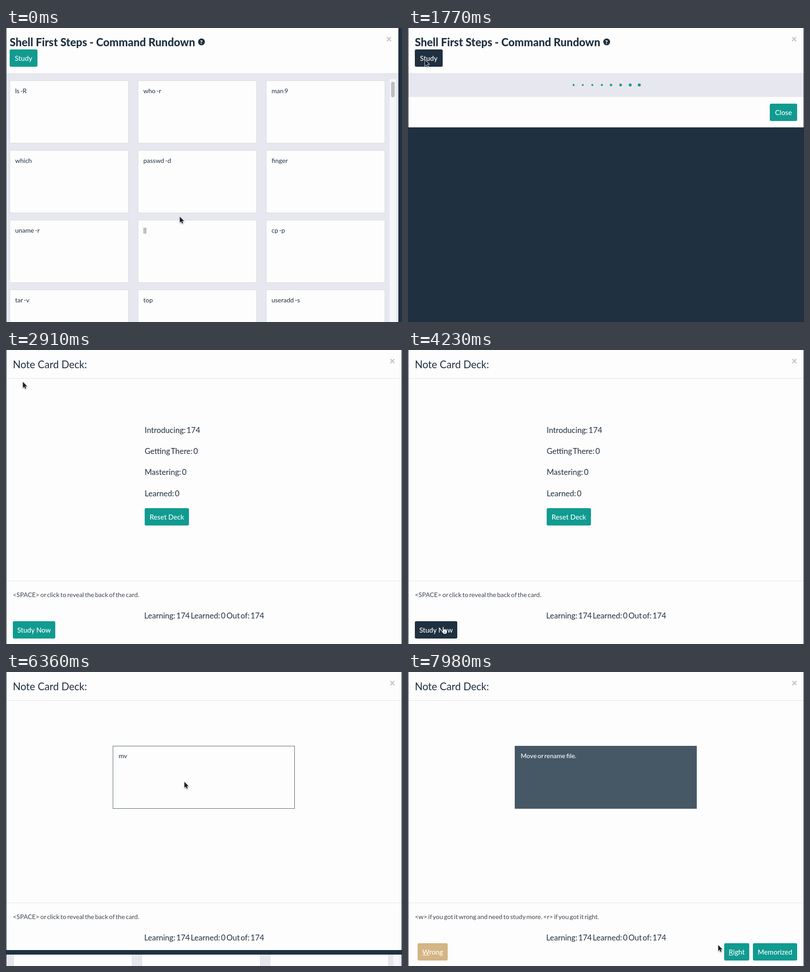
Recreate the animation shown at these times as an HTML page. Size 868 px wide and 645 px high, loop 8 s.

```html
<!DOCTYPE html>
<html lang="en">
<head>
<meta charset="utf-8">
<title>Note cards</title>
<style>
html, body { margin: 0; width: 100%; height: 100%; overflow: hidden; background: #1f3040; }
body { position: relative; font: 14px Lato, "Open Sans", sans-serif; color: #1f3040; }
div, span, svg { position: absolute; box-sizing: border-box; white-space: nowrap; }
.t { line-height: 30px; word-spacing: -.11em; }
.h1 { font-size: 23.9px; font-weight: 800; word-spacing: 0; }
.h2 { font-size: 22.3px; word-spacing: 0; }
.m { font-size: 17.1px; word-spacing: -.14em; }
.hint { color: #3d4650; }
.x { font-size: 22px; font-weight: 900; color: #c6c6c6; }
.btn { border-radius: 3px; background: #119b90; color: #fff; font-size: 15.2px; font-weight: 500; line-height: 38px; text-align: center; }
.btn.on { background: #1f3040; }
.tan { background: #d4b584; }
.white, .card { background: #fdfdfd; }
.card { border: 1px solid #d9d9dc; }
.body { background: #e7e7ef; }
.line { background: #e2e3e6; }
.thumb { background: #bfbfc1; border-radius: 4px; }
.track { background: #f6f6fa; }
.dot { background: #119b90; border-radius: 50%; }
.mark { background: #1f3040; color: #fff; border-radius: 50%; font: 900 12px/15px Lato, sans-serif; text-align: center; }
#list { overflow: hidden; }
#quiz { border-color: #52646c; }
#quiz.back { background: #465866; border-color: #465866; color: #fff; font-weight: 500; }
#deck { border-bottom: 0 solid #1f3040; }
</style>
</head>
<body>
<script>
const LOOP = 8000, LOAD = 1230, OPEN = 1779, STUDY = 4380, REVEAL = 6420, FLIP = 600;

const box = (x, y, w, h, cls = '', inner = '', id = '') =>
  `<div id="${id}" class="${cls}" style="left:${x}px;top:${y}px;width:${w}px;height:${h}px">${inner}</div>`;
const button = (x, y, w, label, id = '', cls = '') => box(x, y, w, 38, 'btn ' + cls, label, id);
const text = (x, y, s, cls = '') =>
  `<span class="t ${cls}" style="left:${x}px;top:${y - 15}px">${s}</span>`;
const group = (id, inner) => box(0, 0, 0, 0, '', inner, id);

const commands = ['ls -R', 'who -r', 'man 9', 'which', 'passwd -d', 'finger',
  'uname -r', '||', 'cp -p', 'tar -v', 'top', 'useradd -s'];
const columns = [8, 289, 570];
const cards = commands.map((c, i) =>
  box(columns[i % 3] - 1, 115 + 153 * Math.floor(i / 3), 261, 138, 'card', text(11, 22, c), 'card' + i)).join('');

const dots = Array.from({length: 8}, (_, i) => box(358.5 + i * 20.7, 122, 6, 6, 'dot')).join('');
const stats = ['Introducing: 174', 'Getting There: 0', 'Mastering: 0', 'Learned: 0']
  .map((s, i) => text(303, 175.5 + i * 46.4, s, 'm')).join('');

document.body.innerHTML =
  box(1, 0, 859, 645, 'white',
    group('grid', box(-8, 100, 875, 545, 'body') + cards +
      box(840, 112, 14, 533, 'track') + box(843, 118, 8, 34, 'thumb')) +
    group('loader', box(0, 100, 866, 50, 'body') + dots + box(0, 150, 866, 1, 'line') +
      button(792, 166, 60, 'Close')) +
    box(0, 99, 866, 1, 'line') +
    group('head', text(7, 31, 'Shell First Steps', 'h1') + text(182, 31, '- Command Rundown', 'h1') +
      box(419.5, 23, 15, 15, 'mark', '?') + text(832, 24, '×', 'x') +
      button(7, 47, 61, 'Study', 'study')), 'list') +
  box(1, 0, 866, 648, 'white',
    text(14, 32, 'Note Card Deck:', 'h2') + text(839.5, 24, '×', 'x') +
    box(0, 62, 866, 1, 'line') + box(0, 506, 866, 1, 'line') +
    text(302, 582.5, 'Learning: 174 Learned: 0 Out of: 174', 'm') +
    group('stats', stats + button(303, 347, 97, 'Reset Deck')) +
    group('start', button(14, 595, 93, 'Study Now', 'now')) +
    group('ask', text(14, 536.5, '&lt;SPACE&gt; or click to reveal the back of the card.', 'hint')) +
    group('grade', text(14, 536.5, '&lt;w&gt; if you got it wrong and need to study more. &lt;r&gt; if you got it right.', 'hint') +
      button(20, 595, 66, '<u>W</u>rong', '', 'tan') + button(692, 595, 55, '<u>R</u>ight') +
      button(755, 595, 97, 'Memorized')) +
    box(233, 162, 399, 138, 'card', '', 'quiz'), 'deck') +
  `<svg id="cursor" width="24" height="24" style="overflow:visible;filter:drop-shadow(0 1px 1px #0006)">
    <path id="arrow" d="M0 0V13L3 10.2L5 15L7.3 14L5.3 9.4H9.4Z" fill="#14202c" stroke="#fff" paint-order="stroke" stroke-width="1.6"/>
    <path id="hand" d="M-1 1.3a1.3 1.3 0 0 1 2.6 0V6l2-.4 1.6.8 1.5.1 1 1.2q1 .3 1 2.2v2.5L7.2 16H.8L-3 10.8q-1-2 .7-2L-1 10ZM2.5 10.5v3M4.5 10.5v3" fill="#fff" stroke="#14202c" stroke-width=".9"/>
  </svg>`;

const $ = id => document.getElementById(id);
const clamp = v => Math.max(0, Math.min(1, v));
const show = (id, on) => $(id).style.display = on ? '' : 'none';
const swing = p => 90 * (1 - Math.cos(Math.PI * p));
const tilt = (el, deg) => el.style.transform = deg ? `perspective(1300px) rotateX(${deg}deg)` : '';

// Vertical coordinate of the cubic-bezier(0, 0, .58, 1) curve
function easeOut(x) {
  let lo = 0, hi = 1, s;
  for (let i = 0; i < 20; i++) {
    s = (lo + hi) / 2;
    if (1.74 * (1 - s) * s * s + s ** 3 < x) lo = s; else hi = s;
  }
  return 3 * (1 - s) * s * s + s ** 3;
}

// time, x, y
const path = [[180, 381, 414], [960, 37, 70], [2910, 37, 70], [3700, 77, 607],
  [5250, 77, 607], [6030, 391, 241], [7500, 391, 241], [7980, 680, 599]];
function pointer(t) {
  let [, x, y] = path[0];
  for (let i = 1; i < path.length; i++) {
    const [a, x0, y0] = path[i - 1], [b, x1, y1] = path[i];
    if (t < a) break;
    const p = clamp((t - a) / (b - a)), e = p * p * (3 - 2 * p);
    x = x0 + (x1 - x0) * e;
    y = y0 + (y1 - y0) * e;
  }
  return [x, y];
}

// card index, pointer enters, pointer leaves
const hovers = [[4, 203, 390], [3, 437, 515], [0, 584, 860]];
const dotEls = [...document.querySelectorAll('.dot')];

function draw(t) {
  const loading = t >= LOAD && t < 2400, moved = t >= LOAD;
  const list = $('list').style;
  list.width = (moved ? 866 : 859) + 'px';
  list.height = (loading ? 218 : 645) + 'px';
  $('head').style.left = (moved ? 7 : 0) + 'px';
  $('grid').style.left = (moved ? 8 : 0) + 'px';
  show('grid', !loading);
  show('loader', loading);
  $('study').classList.toggle('on', t >= 930);
  for (const [i, enter, leave] of hovers) {
    const phase = clamp((Math.min(t, leave) - enter) / FLIP) - clamp((t - leave) / FLIP);
    tilt($('card' + i), swing(clamp(phase)));
  }
  dotEls.forEach((d, i) =>
    d.style.transform = `scale(${0.9 + 0.2 * Math.sin((t - 1890) / 120 - i * 0.5)})`);

  const deck = $('deck').style, asking = t >= STUDY && t < REVEAL;
  show('deck', t >= OPEN);
  deck.opacity = clamp((t - OPEN) / 150);
  deck.transform = `translateY(${-162 * (1 - easeOut(clamp((t - OPEN) / 300)))}px)`;
  deck.height = (asking ? 620 : 648) + 'px';
  deck.borderBottomWidth = (asking ? 10 : 0) + 'px';
  show('stats', t < STUDY);
  show('start', t < STUDY);
  show('quiz', t >= STUDY);
  show('ask', t < REVEAL);
  show('grade', t >= REVEAL);
  $('now').classList.toggle('on', t >= 3720);

  const deg = swing(clamp((t - REVEAL) / FLIP)), back = deg > 90, quiz = $('quiz');
  quiz.classList.toggle('back', back);
  quiz.innerHTML = text(12, 21, back ? 'Move or rename file.' : 'mv');
  tilt(quiz, back ? deg - 180 : deg);

  const [x, y] = pointer(t), hand = (t >= 930 && t < LOAD) || (t >= 3720 && t < STUDY);
  $('cursor').style.left = x + 'px';
  $('cursor').style.top = y + 'px';
  show('hand', hand);
  show('arrow', !hand);
}

function frame() {
  draw(performance.now() % LOOP);
  requestAnimationFrame(frame);
}
frame();
</script>
</body>
</html>
```
